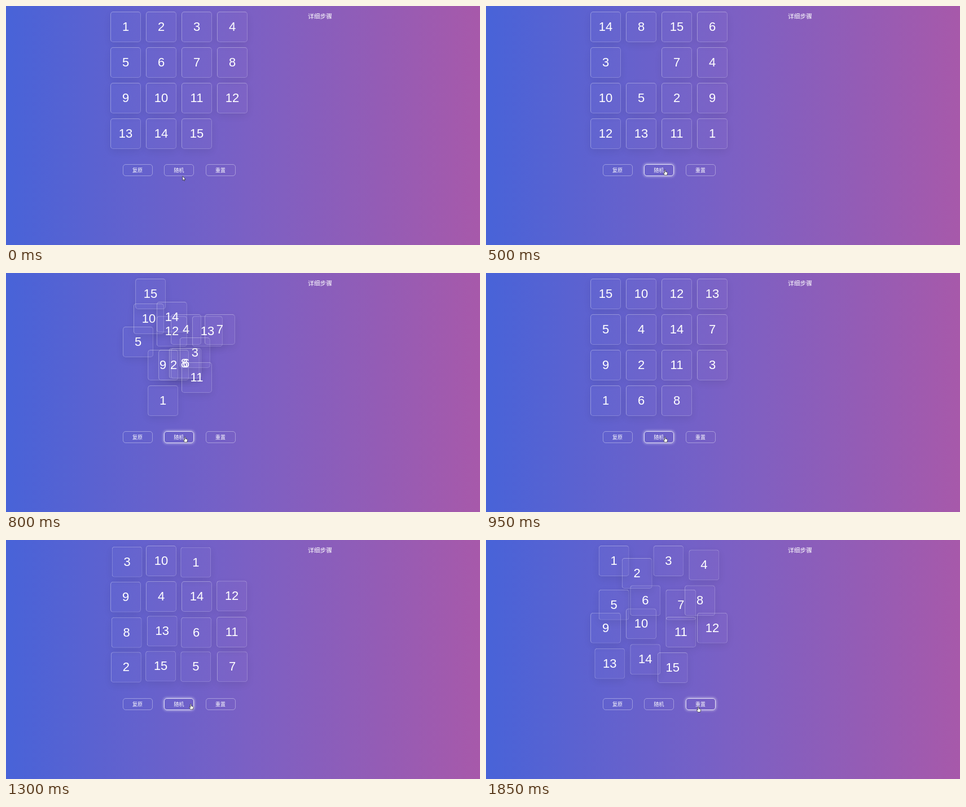
Animation, 840 px wide and 423 px high, one loop 1.9 s. Source, as an HTML page:

```html
<!DOCTYPE html>
<html lang="zh-CN">
<head>
<meta charset="utf-8">
<title>数字华容道</title>
<style>
html, body { margin: 0; width: 100%; height: 100%; overflow: hidden; }
body {
  position: relative;
  color: #fff;
  background: linear-gradient(90deg, #4863d8, #7b60c4 51%, #a759aa);
  font-family: "Noto Sans CJK SC", "Noto Sans CJK", sans-serif;
}
.tile, .btn, .title, #cursor { position: absolute; box-sizing: border-box; }
.tile {
  left: 0; top: 0; width: 54px; height: 54px;
  border: 1px solid rgba(255,255,255,.2);
  border-top-color: rgba(255,255,255,.32);
  border-left-color: rgba(255,255,255,.32);
  border-radius: 5px;
  background: rgba(255,255,255,.025);
  box-shadow: 0 5px 14px rgba(0,0,0,.07);
  font: 22px/52px "Liberation Sans", Arial, sans-serif;
  text-align: center;
}
.btn {
  top: 279.5px; width: 53px; height: 21.5px;
  border: 1px solid rgba(255,255,255,.36);
  border-radius: 5px;
  font-size: 9px; line-height: 20px;
  text-align: center;
}
.btn.hover {
  border-color: rgba(255,255,255,.8);
  box-shadow: 0 0 4px 1px rgba(255,255,255,.5);
}
.title { left: 535px; top: 8px; font-size: 10.75px; line-height: 20px; white-space: nowrap; }
#cursor { left: 0; top: 0; width: 12px; height: 14px; overflow: visible; }
#cursor path { fill: #fff; stroke: #222; stroke-width: .7; stroke-linejoin: round; }
</style>
</head>
<body>
<div id="board"></div>
<div class="btn" style="left:206.5px">复原</div>
<div class="btn" style="left:280px">随机</div>
<div class="btn" style="left:353.5px">重置</div>
<div class="title">详细步骤</div>
<svg id="cursor">
  <path id="arrow" d="M0 0V7.6L1.7 6.1L2.8 8.5L3.9 8L2.9 5.7H5Z"/>
  <path id="hand" d="M-.9 .7Q0 -.6 .8 .7V3.8L3.6 4.4Q4.6 4.7 4.5 5.8L3.7 9.7H-.7L-2.8 6.6Q-3 5.4 -1.9 5.7L-.9 6.5Z"/>
</svg>
<script>
const LOOP = 1900, STEP = 50, MOVE = 200;
const CELL = 63, LEFT = 185, TOP = 10;

// Board states, row by row; 0 is the gap.
const boards = [
  "1 2 3 4 5 6 7 8 9 10 11 12 13 14 15 0",
  "14 8 15 6 3 0 7 4 10 5 2 9 12 13 11 1",
  "15 10 12 13 5 4 14 7 9 2 11 3 1 6 8 0",
  "3 10 1 0 9 4 14 12 8 13 6 11 2 15 5 7"
].map(s => s.split(" ").map(Number));
boards.push(boards[0]);
const starts = [293.8, 724.4, 1130.5, 1730.4];

// Pointer path: time, x, y
const path = [
  [0, 313, 301], [100, 313.5, 300.5], [250, 315.5, 295], [300, 315.5, 295],
  [450, 317.2, 289.7], [1250, 317.2, 289.7], [1550, 379.5, 292],
  [1700, 379.5, 292], [1850, 376.2, 294.8]
];

const $ = id => document.getElementById(id);
const clamp = v => Math.max(0, Math.min(1, v));
const lerp = (a, b, k) => a + (b - a) * k;

const tiles = Array.from({ length: 15 }, (_, i) => {
  const el = document.createElement("div");
  el.className = "tile";
  el.textContent = i + 1;
  return $("board").appendChild(el);
});
const buttons = [...document.querySelectorAll(".btn")];

function bezier(a, b, s) {
  const r = 1 - s;
  return 3 * r * r * s * a + 3 * r * s * s * b + s * s * s;
}

// CSS "ease" curve
function ease(x) {
  if (x <= 0 || x >= 1) return clamp(x);
  let lo = 0, hi = 1;
  for (let i = 0; i < 24; i++) {
    const mid = (lo + hi) / 2;
    if (bezier(.25, .25, mid) < x) lo = mid; else hi = mid;
  }
  return bezier(.1, 1, lo);
}

function pointer(t) {
  let i = 0;
  while (i < path.length - 2 && t >= path[i + 1][0]) i++;
  const [a, b] = [path[i], path[i + 1]];
  const k = clamp((t - a[0]) / (b[0] - a[0]));
  return [lerp(a[1], b[1], k), lerp(a[2], b[2], k)];
}

// Button fill while pressed, fading after release
function press(t) {
  return Math.max(...starts.map(s => {
    const d = t - s;
    return d < -100 ? 0 : .22 * clamp(1 - (d + 25) / 75);
  }));
}

function drawTiles(t) {
  let n = 0;
  while (n < starts.length - 1 && t >= starts[n + 1]) n++;
  const k = ease((t - starts[n]) / MOVE);
  tiles.forEach((el, i) => {
    const a = boards[n].indexOf(i + 1), b = boards[n + 1].indexOf(i + 1);
    const x = LEFT + CELL * lerp(a % 4, b % 4, k);
    const y = TOP + CELL * lerp(a >> 2, b >> 2, k);
    el.style.transform = `translate(${x}px, ${y}px)`;
  });
}

function drawPointer(t) {
  const [x, y] = pointer(t);
  let over = false;
  buttons.forEach(el => {
    const hit = y < 300 && x >= el.offsetLeft && x <= el.offsetLeft + 53;
    over = over || hit;
    el.classList.toggle("hover", hit);
    el.style.background = `rgba(255,255,255,${hit ? press(t) : 0})`;
  });
  $("cursor").style.transform = `translate(${x}px, ${y}px)`;
  $("hand").style.display = over ? "" : "none";
  $("arrow").style.display = over ? "none" : "";
}

let begin;
function frame(now) {
  begin ??= now;
  const t = Math.floor(((now - begin) % LOOP) / STEP) * STEP;
  drawTiles(t);
  drawPointer(t);
  requestAnimationFrame(frame);
}
drawTiles(0);
drawPointer(0);
requestAnimationFrame(frame);
</script>
</body>
</html>
```
